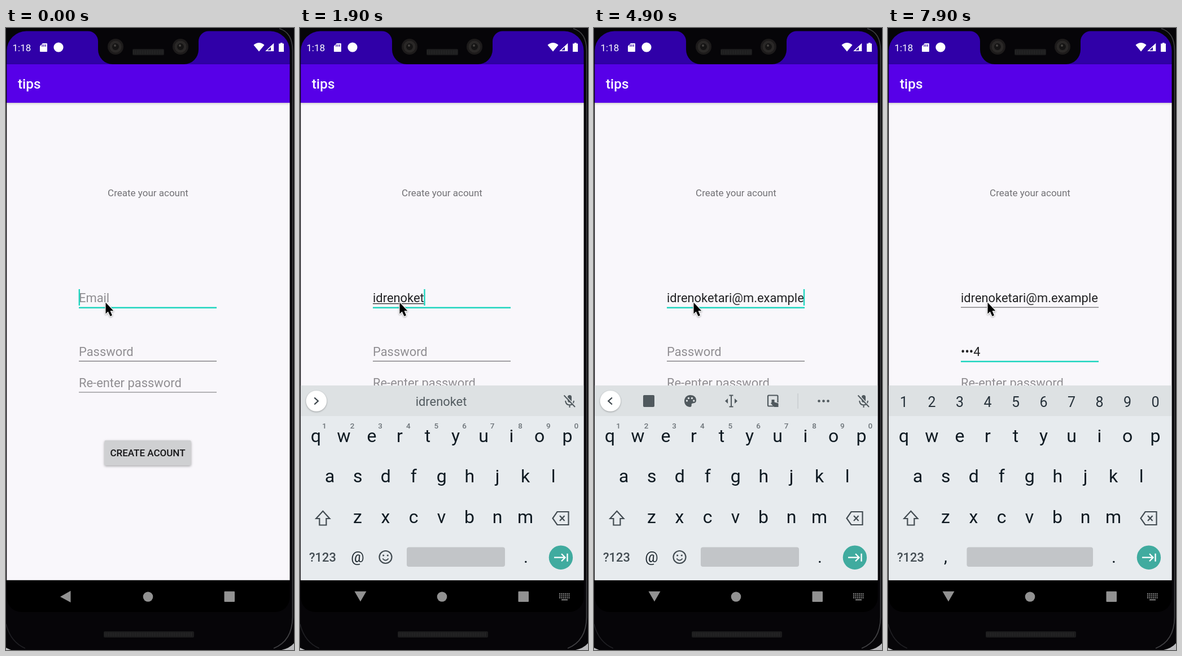
Animation of 510x1098 px, one loop 8 s. Source, as an HTML page with a canvas:

```html
<!DOCTYPE html>
<html lang="en">
<head>
<meta charset="utf-8">
<title>Sign-up form</title>
<style>
  html, body { margin: 0; width: 100%; height: 100%; overflow: hidden; background: #060508; }
  canvas { display: block; width: 510px; height: 1098px; }
</style>
</head>
<body>
<canvas id="stage" width="510" height="1098"></canvas>
<script>
const ctx = document.getElementById('stage').getContext('2d');
const LOOP = 8000, STEP = 100;

const USER = 'idrenoketari', DOMAIN = '@m.example', PIN = '1234';
const FOCUS_PASSWORD = 5250, KEYBOARD_IN = 590;

const TEAL = '#20d5bf', INK = '#212123', HINT = '#908e92', ICON = '#50595e', KEY = '#0f1a22';
const SCREEN_X = 1.3, SCREEN_W = 501.2, SCREEN_END = 974.8;
const FIELD_X = 129, FIELD_END = 373, FIELD_SIZE = 21.9;

// Key press times: a short word, its continuation, the domain, then the password
const emailTimes = [...USER + DOMAIN].map((_, i) =>
  i < 5 ? 500 + i * 150 :
  i < 12 ? 1300 + (i - 5) * 180 :
  2900 + (i - 12) * 190);
const pinTimes = [5700, 6050, 6700, 7250];

function font(size, weight = 400) {
  ctx.font = `${weight} ${size}px Roboto, sans-serif`;
}

function text(str, x, y, size, color, align = 'left', weight = 400) {
  font(size, weight);
  ctx.textAlign = align;
  ctx.fillStyle = color;
  ctx.fillText(str, x, y);
}

function rect(x, y, w, h, color, r = 0) {
  ctx.fillStyle = color;
  ctx.beginPath();
  ctx.roundRect(x, y, w, h, r);
  ctx.fill();
}

function disc(x, y, r, color) {
  ctx.fillStyle = color;
  ctx.beginPath();
  ctx.arc(x, y, r, 0, Math.PI * 2);
  ctx.fill();
}

function shape(d, color) {
  ctx.fillStyle = color;
  ctx.fill(new Path2D(d));
}

function line(d, color, width = 2) {
  ctx.strokeStyle = color;
  ctx.lineWidth = width;
  ctx.stroke(new Path2D(d));
}

function withShadow(blur, dy, alpha, draw) {
  ctx.save();
  ctx.shadowColor = `rgba(0,0,0,${alpha})`;
  ctx.shadowBlur = blur;
  ctx.shadowOffsetY = dy;
  draw();
  ctx.restore();
}

function drawBody() {
  rect(0, 0, 510, 1098, '#060508');
  line('M484 1Q507.5 8 507.5 40V1040Q507 1082 474 1095', '#404043', 1.8);
  line('M0 1052Q8 1084 34 1095', '#202024', 1.5);
  shape('M0 1094Q4 1096 9 1098H0Z M510 1086V1098H488Q502 1095 510 1086Z', '#b9b9bc');
  rect(SCREEN_X, 974, SCREEN_W, 57, '#000', [0, 0, 26, 26]);
  grille(173, 1065, 160, 11);
}

function grille(x, y, w, h) {
  rect(x, y, w, h, '#1b1b1c', 2);
  for (let i = 2; i < w - 2; i += 3) rect(x + i, y + 2, 1, h - 4, '#2b2b2c');
}

function drawBars() {
  shape('M1.3 64.5V40A35 35 0 0 1 36 5.5H145A18 18 0 0 1 163 23.5V38A26 26 0 0 0 189 64' +
        'H315A26 26 0 0 0 341 38V23.5A18 18 0 0 1 359 5.5H468A35 35 0 0 1 502.5 40V64.5Z', '#3000a8');
  withShadow(4, 1, 0.25, () => rect(SCREEN_X, 64, SCREEN_W, 68, '#5700e8'));
  for (const x of [194, 309]) {
    disc(x, 33, 14, '#1d1b1b');
    disc(x, 33, 10.5, '#2a2827');
    disc(x, 33, 6, '#151414');
    disc(x - 1, 31, 2, '#454340');
  }
  grille(224, 37, 56, 11);

  text('1:18', 11.5, 40.5, 17, '#fff');
  shape('M65 27H72Q73 27 73 28V41Q73 42 72 42H61Q60 42 60 41V32Z', '#fff');
  for (const x of [64, 67, 70]) rect(x - 0.6, 29, 1.3, 4, '#3000a8');
  disc(93, 34, 8.6, '#fff');
  shape('M438.5 30Q448 22 457.5 30L448 41.5Z', '#fff');
  line('M473.5 28.5V40.3H461Z', '#fff', 1.5);
  shape('M469 33L474 28V41H469Z', '#fff');
  shape('M485 27.5H486V26H489.5V27.5H492V42H483V27.5Z', '#fff');
  text('tips', 21, 107, 24.3, '#fff', 'left', 500);
}

function drawField(value, hint, baseline, focused, cursorOn, composing) {
  text(value || hint, FIELD_X, baseline, FIELD_SIZE, value ? INK : HINT);
  const width = value ? ctx.measureText(value).width : 0;
  if (composing) rect(FIELD_X, baseline + 2, width, 1.2, INK);
  if (focused) {
    rect(FIELD_X, baseline + 8.5, FIELD_END - FIELD_X, 2.5, TEAL);
    if (cursorOn) rect(Math.min(FIELD_X + width - 0.4, FIELD_END - 2.2), baseline - 23, 2.4, 29, TEAL);
  } else {
    rect(FIELD_X, baseline + 8.6, FIELD_END - FIELD_X, 1.2, '#6f6e71');
  }
}

function drawPointer() {
  const arrow = 'M176.5 484.5V504.5L180.8 500.5L184.5 508.7L188 507.2L184.5 499.2H190.3Z';
  withShadow(3, 1, 0.35, () => {
    ctx.lineJoin = 'round';
    line(arrow, '#fff', 2.4);
  });
  shape(arrow, '#000');
}

function drawNav(keyboardOpen) {
  const gray = '#929292';
  shape(keyboardOpen ? 'M96.5 994.5H117.5L107 1012.5Z' : 'M96 1004L114.5 993.5V1014Z', gray);
  disc(251.5, 1004, 8.8, gray);
  rect(386.5, 994.5, 18.5, 18.5, gray, 1);
  if (!keyboardOpen) return;
  for (let row = 0; row < 3; row++)
    for (let col = 0; col < 6; col++)
      rect(459 + col * 3.3, 998 + row * 3.4, 2, 2, gray);
  rect(463, 1008.5, 11, 1.8, gray);
}

function drawMicOff() {
  rect(474, 648, 7, 13, ICON, 3.5);
  line('M470 658Q471 665.5 477.5 665.5Q484 665.5 485 658M477.5 665.5V670', ICON, 2);
  line('M469.5 648.5L488 668', '#dde1e3', 2);
  line('M467.5 648.5L487 669', ICON, 2);
}

function drawTools() {
  rect(87, 648, 20, 21, ICON, 2);

  shape('M170.5 648C163 648 160 654 160 658.5C160 665 165 669 170 669' +
        'C174 669 172 665 173 663.5C175 661 181 664 181 657C181 651 176 648 170.5 648Z', ICON);
  [[164.5, 658], [167.5, 653.5], [173.5, 653.5], [176.8, 658]].forEach(([x, y]) => disc(x, y, 1.7, '#dde1e3'));

  line('M239.5 648.5H246.5M239.5 668.5H246.5M243 648.5V668.5', ICON, 2);
  shape('M237 654V663L232 658.5ZM249 654V663L254 658.5Z', ICON);

  line('M318 667.5H309Q308 667.5 308 666V650Q308 648.5 309.5 648.5H324Q325.5 648.5 325.5 650V661', ICON, 2.2);
  shape('M314.5 656H319.5V660.5L326.5 662.5V669H319L313 662.5L314.5 661Z', ICON);

  rect(360.5, 645, 1.2, 27, '#c3c8cb');
  for (const x of [398.5, 406.5, 414.5]) disc(x, 658.5, 2.3, ICON);
}

function drawStrip(mode, word) {
  if (mode === 'digits') {
    [...'1234567890'].forEach((d, i) => text(d, 28 + i * 49.5, 669, 25, '#26313a', 'center'));
    return;
  }
  withShadow(3, 1, 0.3, () => disc(29, 658.5, 18.3, '#fff'));
  line(mode === 'word' ? 'M25.5 652.5L32 658.5L25.5 664.5' : 'M32 652.5L25.5 658.5L32 664.5', '#3c454b', 2.3);
  if (mode === 'word') text(word, 250, 667, FIELD_SIZE, '#525b60', 'center');
  else drawTools();
  drawMicOff();
}

function drawKeys(password) {
  const rows = [['qwertyuiop', 28, 730.5], ['asdfghjkl', 52.7, 802], ['zxcvbnm', 102, 874]];
  for (const [letters, x, y] of rows)
    [...letters].forEach((c, i) => text(c, x + i * 49.5, y, 32, KEY, 'center'));
  if (!password)
    [...'1234567890'].forEach((d, i) => text(d, 43 + i * 49.6, 707, 13.5, '#6c7378', 'center', 500));

  line('M40.5 852.8L52.5 866H46.5V877.5H34.5V866H28.5Z', '#434c52', 2.2);
  line('M455.5 854H475.5V877H455.5L447.5 865.5Z', '#434c52', 2.2);
  line('M460 861L468.5 870M468.5 861L460 870', '#434c52', 2.2);

  text('?123', 40, 942, 22, '#434c52', 'center', 500);
  if (password) {
    text(',', 102, 943, 30, KEY, 'center');
  } else {
    text('@', 102, 942.5, 26, '#1d272e', 'center');
    ctx.strokeStyle = '#434c52';
    ctx.lineWidth = 2.2;
    ctx.beginPath();
    ctx.arc(151.5, 934, 11, 0, Math.PI * 2);
    ctx.stroke();
    disc(147.7, 931, 1.6, '#434c52');
    disc(155.3, 931, 1.6, '#434c52');
    line('M146.3 936.5Q151.5 943 156.7 936.5', '#434c52', 2);
  }
  const left = password ? 139.5 : 189;
  rect(left, 916.5, 363 - left, 34.5, '#c2c5c8', 4);
  text('.', 400, 943.5, 30, KEY, 'center');
  disc(461.9, 934.7, 21.2, '#40ab9f');
  line('M450 934.7H469M463 928.2L469.5 934.7L463 941.2M473.5 927.7V941.7', '#fff', 2.3);
}

function drawKeyboard(t, mode, word) {
  const age = t - KEYBOARD_IN;
  if (age < 0) return;
  const left = 1 - Math.min(1, age / 320);
  ctx.save();
  ctx.lineJoin = 'miter';
  ctx.beginPath();
  ctx.rect(SCREEN_X, 600, SCREEN_W, 431);
  ctx.clip();
  ctx.globalAlpha = Math.min(1, age / 134);
  ctx.translate(0, Math.round(46 * left ** 3));
  rect(SCREEN_X, 631, SCREEN_W, 54, '#dde1e3');
  rect(SCREEN_X, 685, SCREEN_W, SCREEN_END - 685, '#e7ebee');
  drawStrip(mode, word);
  drawKeys(mode === 'digits');
  ctx.restore();
}

function typedCount(times, t) {
  return times.filter(at => at <= t).length;
}

function maskedPin(t) {
  const n = typedCount(pinTimes, t);
  if (!n) return '';
  const shown = t - pinTimes[n - 1] < 1500;
  return '•'.repeat(n - 1) + (shown ? PIN[n - 1] : '•');
}

function draw(t) {
  const count = typedCount(emailTimes, t);
  const email = (USER + DOMAIN).slice(0, count);
  const onPassword = t >= FOCUS_PASSWORD;
  const composing = count > 0 && count <= USER.length;
  const mode = onPassword ? 'digits' : composing && t >= 900 ? 'word' : 'tools';
  const lastInput = Math.max(0, ...[...emailTimes, FOCUS_PASSWORD, ...pinTimes].filter(at => at <= t));
  const cursorOn = (t - lastInput) % 1000 < 500;

  drawBody();
  rect(SCREEN_X, 132, SCREEN_W, SCREEN_END - 132, '#f9f7fb');
  drawBars();
  text('Create your acount', 251.5, 297, 17, '#727175', 'center');
  drawField(email, 'Email', 484, !onPassword, cursorOn, composing);
  drawField(maskedPin(t), 'Password', 579, onPassword, cursorOn);
  drawField('', 'Re-enter password', 633.8, false);
  withShadow(4, 1.5, 0.35, () => rect(174.5, 728, 153, 44, '#cfd0d2', 2));
  text('CREATE ACOUNT', 251, 756, 17, '#151517', 'center', 500);
  drawNav(t >= KEYBOARD_IN);
  drawKeyboard(t, mode, email);
  drawPointer();
}

function tick() {
  draw(Math.floor(performance.now() % LOOP / STEP) * STEP);
  requestAnimationFrame(tick);
}
tick();
</script>
</body>
</html>
```
